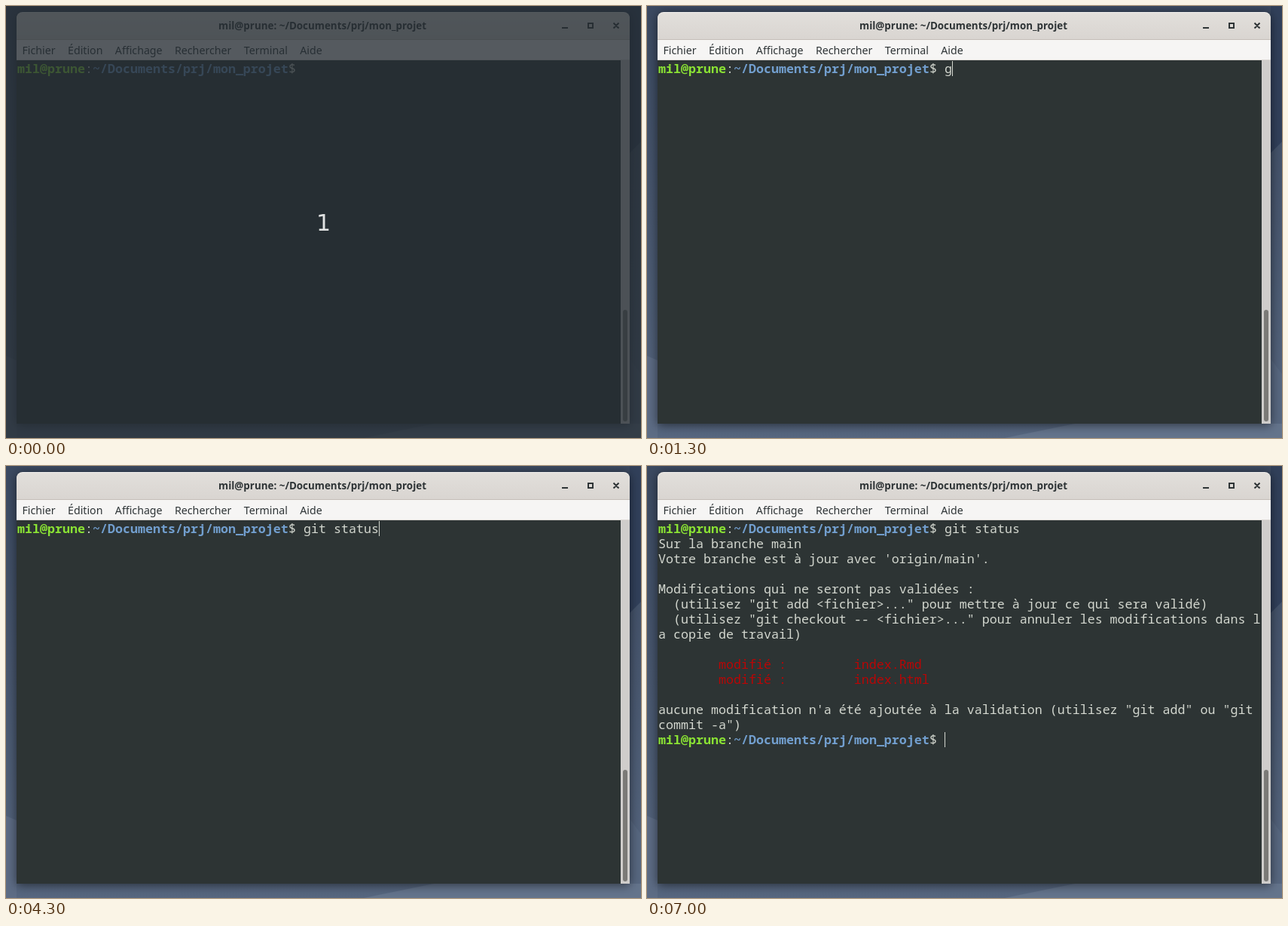
An HTML page with a canvas that plays this animation: 843x573 px, repeating every 8 s.

```html
<!DOCTYPE html>
<html lang="fr">
<head>
<meta charset="utf-8">
<style>
  html, body { margin: 0; width: 100%; height: 100%; overflow: hidden; background: #45546c; }
  canvas { display: block; }
</style>
</head>
<body>
<canvas id="stage" width="843" height="573"></canvas>
<script>
const ctx = document.getElementById('stage').getContext('2d');
const MONO = '16.667px "Noto Sans Mono", monospace';
const SANS = '"Noto Sans", sans-serif';
const FG = '#d3d7cf', GREEN = '#8ae234', BLUE = '#729fcf', RED = '#b80606', INK = '#2e3436';
const USER = 'mil@prune', DIR = '~/Documents/prj/mon_projet';
const COMMAND = 'git status';
const MENU = ['Fichier', 'Édition', 'Affichage', 'Rechercher', 'Terminal', 'Aide'];

// Times in ms; the cursor starts hidden and flips at each blink
const LOOP = 8000, UNVEIL = 500, OUTPUT_AT = 4500;
const KEYS = [1300, 1400, 1600, 2400, 2400, 2400, 2700, 3000, 3500, 3900];
const BLINKS = [200, 900, 1100, 2200, 2400, 3300, 3500, 4200, 4300, 5500, 6500, 6900, 7000];

const OUTPUT = `Sur la branche main
Votre branche est à jour avec 'origin/main'.

Modifications qui ne seront pas validées :
  (utilisez "git add <fichier>..." pour mettre à jour ce qui sera validé)
  (utilisez "git checkout -- <fichier>..." pour annuler les modifications dans la copie de travail)

        modifié :         index.Rmd
        modifié :         index.html

aucune modification n'a été ajoutée à la validation (utilisez "git add" ou "git commit -a")`;
const ROWS = OUTPUT.split('\n').flatMap(line => line.match(/.{1,80}/g) || ['']);

const passed = (times, now) => times.filter(t => t <= now).length;

function rect(x, y, w, h, color) {
  ctx.fillStyle = color;
  ctx.fillRect(x, y, w, h);
}

function rounded(x, y, w, h, radii, color) {
  ctx.fillStyle = color;
  ctx.beginPath();
  ctx.roundRect(x, y, w, h, radii);
  ctx.fill();
}

function shape(path, color) {
  ctx.fillStyle = color;
  ctx.fill(new Path2D(path));
}

function text(string, x, y, font, color, align = 'left') {
  ctx.font = font;
  ctx.fillStyle = color;
  ctx.textAlign = align;
  ctx.fillText(string, x, y);
}

function vertical(y0, y1, from, to) {
  const gradient = ctx.createLinearGradient(0, y0, 0, y1);
  gradient.addColorStop(0, from);
  gradient.addColorStop(1, to);
  return gradient;
}

function desktop() {
  rect(0, 0, 843, 573, vertical(0, 573, '#3b4960', '#56667f'));
  shape('M0 464 L14 470 V573 H0Z', '#5d6c85');
  shape('M828 0 H843 V180 L828 195Z', '#31405a');
  shape('M828 468 L843 488 V573 H828Z', '#576780');
  shape('M475 573 L568 554 H843 V573Z', '#64748c');
}

function windowFrame() {
  ctx.save();
  ctx.shadowColor = 'rgba(0,0,0,.55)';
  ctx.shadowBlur = 14;
  ctx.shadowOffsetY = 2;
  rounded(14, 8, 814, 546, [8, 8, 0, 0], '#2d3434');
  ctx.restore();

  rounded(14, 8, 814, 36, [8, 8, 0, 0], '#f3f1ef');
  rounded(14, 9, 814, 35, [8, 8, 0, 0], vertical(8, 44, '#e2dfdb', '#d9d5d1'));
  rect(14, 44, 814, 1, '#c4beb8');
  rect(14, 45, 814, 27, '#f6f5f4');
  rect(14, 71, 814, 1, '#dcd8d4');
  text(`${USER}: ${DIR}`, 420, 31, `bold 13.4px ${SANS}`, INK, 'center');

  let x = 21.5;
  for (const label of MENU) {
    text(label, x, 64, `14.2px ${SANS}`, INK);
    x += ctx.measureText(label).width + 16.4;
  }

  rect(738, 28, 8, 2, INK);
  ctx.strokeStyle = INK;
  ctx.lineWidth = 2;
  ctx.stroke(new Path2D('M773 23h6v6h-6z M806.5 22.5l7 7 m0 -7l-7 7'));

  rect(816, 72, 12, 482, '#cfcdcb');
  rounded(819, 403, 6, 148, 3, '#7b7a77');
}

// Terminal cells are 10 by 20 pixels
function cell(string, col, row, color = FG, weight = '') {
  text(string, 15 + col * 10, 89 + row * 20, weight + MONO, color);
}

// Returns the column where typing starts
function prompt(row) {
  let col = 0;
  for (const [part, ...style] of [[USER, GREEN, 'bold '], [':'], [DIR, BLUE, 'bold '], ['$ ']]) {
    cell(part, col, row, ...style);
    col += part.length;
  }
  return col;
}

function terminal(time) {
  const typed = COMMAND.slice(0, passed(KEYS, time));
  let row = 0, col = prompt(row);
  cell(typed, col, row);
  if (time < OUTPUT_AT) {
    col += typed.length;
  } else {
    for (const line of ROWS) cell(line, 0, ++row, line.includes('modifié ') ? RED : FG);
    col = prompt(++row);
  }
  if (passed(BLINKS, time) % 2) rect(15 + col * 10, 73 + row * 20, 1, 20, FG);
}

function draw() {
  const time = performance.now() % LOOP;
  desktop();
  windowFrame();
  terminal(time);
  if (time < UNVEIL) {
    rect(0, 0, 843, 573, 'rgba(37,45,51,.77)');
    text('1', 421.5, 298, '30px "DejaVu Sans", sans-serif', '#e0e2e2', 'center');
  }
  requestAnimationFrame(draw);
}
draw();
</script>
</body>
</html>
```
